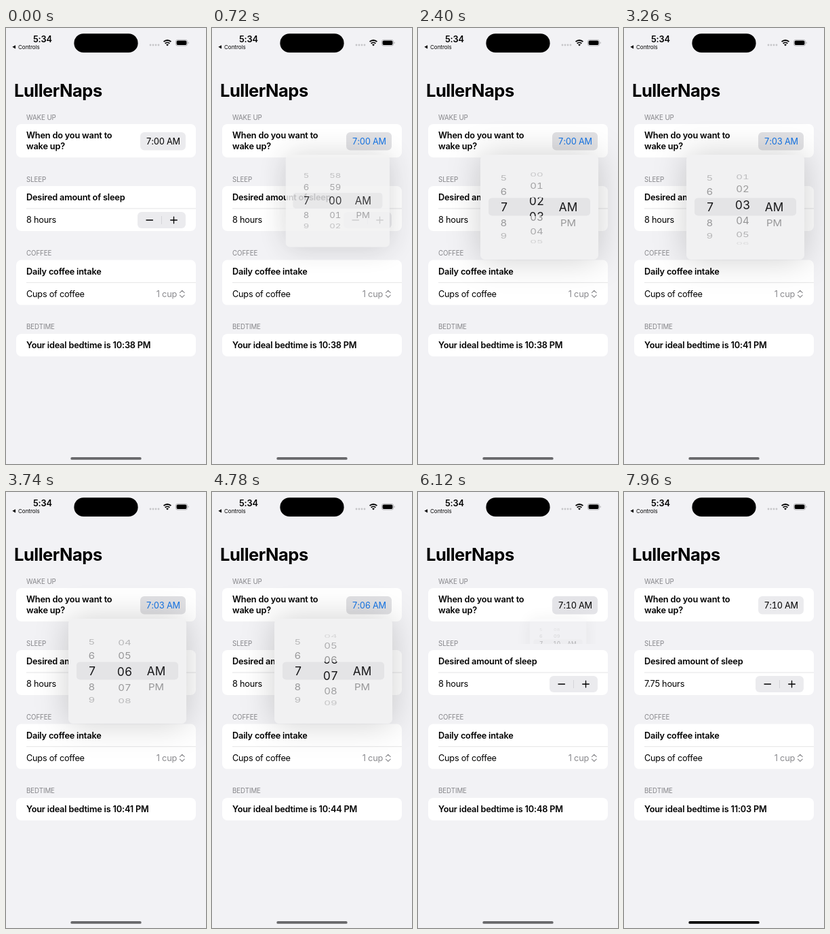
Recreate the animation shown at these times as an HTML page. Size 295 px wide and 640 px high, loop 8 s.

```html
<!DOCTYPE html>
<html lang="en">
<head>
<meta charset="utf-8">
<title>Bedtime planner</title>
<style>
html, body { margin: 0; height: 100%; overflow: hidden; background: #f2f2f5; }
svg { display: block; width: 295px; height: 640px; font: 12.75px Inter, "Liberation Sans", sans-serif; letter-spacing: -.25px; }
.bold { font-weight: 600; letter-spacing: -.19px; }
.head { font-size: 9.75px; fill: #858589; letter-spacing: -.1px; }
.card { fill: #fff; }
.line { stroke: #dcdcdf; stroke-width: .8; }
.icon { fill: none; stroke: #000; stroke-width: 1.3; stroke-linecap: round; stroke-linejoin: round; }
.panel { fill: #f1f1f2; filter: drop-shadow(0 0 24px rgba(0, 0, 0, .19)); }
#side, #mid { text-anchor: middle; letter-spacing: 0; }
#side { font-size: 15px; }
#mid { font-size: 17.3px; }
#side, #mid, #wake { font-variant-numeric: tabular-nums; }
</style>
</head>
<body>
<svg viewBox="0 0 295 640">
  <defs>
    <clipPath id="band"><rect x="104" y="249" width="150" height="27"/></clipPath>
    <clipPath id="rest"><path d="M92 186h174v63H92zM92 276h174v64H92z"/></clipPath>
    <clipPath id="fold"><rect id="foldBox" width="295" height="640"/></clipPath>
  </defs>

  <text class="bold" x="40" y="21">5:34</text>
  <path d="M14 25.2v5.2l-4.6-2.6z"/>
  <text x="18" y="31" font-size="8" letter-spacing="0">Controls</text>
  <rect x="100.4" y="8.3" width="94.2" height="27.8" rx="13.9"/>
  <g fill="#c6c6c9"><circle cx="213" cy="25" r="1.4"/><circle cx="217" cy="25" r="1.4"/><circle cx="221" cy="25" r="1.4"/><circle cx="225" cy="25" r="1.4"/></g>
  <g fill="none" stroke="#000" stroke-width="1.9">
    <path d="M232.6 20.2a7.6 7.6 0 0 1 10.8 0M234.7 22.7a4.7 4.7 0 0 1 6.6 0"/>
  </g>
  <path d="M236.2 24.4a2.6 2.6 0 0 1 3.6 0L238 26.4z"/>
  <rect x="250.4" y="17.4" width="17.2" height="8.7" rx="2.7" fill="none" stroke="#a4a4a7" stroke-width=".8"/>
  <rect x="251.6" y="18.6" width="14.8" height="6.3" rx="1.7"/>
  <path d="M268.6 20.3a1.6 1.6 0 0 1 0 3z" fill="#a4a4a7"/>

  <text x="12" y="100.5" font-size="25.5" font-weight="700" letter-spacing="-.5">LullerNaps</text>

  <text class="head" x="30" y="134.5">WAKE UP</text>
  <rect class="card" x="15" y="141" width="265" height="49" rx="7.5"/>
  <text class="bold" x="30" y="162">When do you want to</text>
  <text class="bold" x="30" y="178">wake up?</text>
  <rect id="button" x="198" y="153" width="67" height="26.5" rx="6"/>
  <text id="wake" x="231.7" y="171" text-anchor="middle"></text>

  <text class="head" x="30" y="225.5">SLEEP</text>
  <rect class="card" x="15" y="232" width="265" height="66" rx="7.5"/>
  <text class="bold" x="30" y="253.2">Desired amount of sleep</text>
  <path class="line" d="M30 265h250"/>
  <text id="hours" x="30" y="286.3"></text>
  <rect x="194" y="270" width="71" height="24" rx="6" fill="#ebebee"/>
  <path id="press" d="M200 270h29.5v24H200a6 6 0 0 1-6-6v-12a6 6 0 0 1 6-6z" fill="#dadade"/>
  <path d="M229.5 276v12" stroke="#cfcfd3" stroke-width=".8"/>
  <path class="icon" d="M207 282h9.5M242.7 282h9.6M247.5 277.2v9.6"/>

  <text class="head" x="30" y="333.5">COFFEE</text>
  <rect class="card" x="15" y="340.6" width="265" height="66" rx="7.5"/>
  <text class="bold" x="30" y="361.7">Daily coffee intake</text>
  <path class="line" d="M30 373.7h250"/>
  <text x="30" y="394.7">Cups of coffee</text>
  <text x="252" y="394.7" text-anchor="end" fill="#8a8a8e">1 cup</text>
  <path class="icon" style="stroke:#858589;stroke-width:1.1" d="M256.4 388.6l3.4-3.2 3.4 3.2M256.4 392.2l3.4 3.2 3.4-3.2"/>

  <text class="head" x="30" y="442">BEDTIME</text>
  <rect class="card" x="15" y="449" width="265" height="33" rx="7.5"/>
  <text id="bed" class="bold" x="30" y="470.2"></text>

  <g id="popover">
    <g id="foldable">
      <rect class="panel" x="92" y="186" width="174" height="154" rx="7"/>
      <rect x="104" y="249.5" width="150" height="26" rx="5" fill="#e4e4e6"/>
      <g clip-path="url(#rest)"><g id="side"></g></g>
      <g clip-path="url(#band)"><g id="mid"></g></g>
    </g>
  </g>
  <rect id="home" x="95.3" y="630" width="104.4" height="3.8" rx="1.9"/>
</svg>
<script>
const $ = id => document.getElementById(id);
const LOOP = 8000;

// Each track: [start ms, value...]; a value holds until the next start.
const POPOVER = [ // scale, opacity, visible share of height
  [0, 0, 0, 1], [500, .12, .1, 1], [610, .5, .45, 1], [720, .88, .85, 1], [830, 1.02, 1, 1], [940, 1, 1, 1],
  [6000, .86, .7, 1], [6120, .48, .3, .5], [6230, 0, 0, 1]];
const MINUTE = [
  [0, 0], [2060, .2], [2172, .9], [2284, 1.7], [2396, 2.4], [2500, 2.85], [2620, 3],
  [3260, 3.15], [3380, 4], [3500, 4.9], [3620, 5.65], [3740, 5.96], [4400, 6], [4630, 6.15],
  [4780, 6.7], [4897, 7.9], [5015, 9], [5130, 9.8], [5250, 10]];
const CHOSEN = [[0, 0], [3260, 3], [4400, 6], [5410, 10]];
const pad = n => String(n).padStart(2, '0');

function at(track, t) {
  return track.findLast(k => k[0] <= t).slice(1);
}

// Rows of a picker column wrapped around a cylinder.
function column(x, pos, label, strong) {
  let out = '';
  for (let i = Math.ceil(pos - 2.9); i <= pos + 2.9; i++) {
    const angle = (i - pos) * .43, text = label(i);
    if (!text) continue;
    const y = 263 + 56 * Math.sin(angle), c = Math.cos(angle);
    const alpha = strong ? 1 : Math.max(0, .56 * c - .1);
    out += `<text transform="translate(${x} ${y}) scale(1 ${c})" y="${strong ? 6.2 : 5.4}" fill="#161618" fill-opacity="${alpha}">${text}</text>`;
  }
  return out;
}

function wheels(minute, strong) {
  return column(strong ? 127 : 126.3, 7, i => i, strong)
    + column(175, minute, i => pad((i + 60) % 60), strong)
    + column(221.5, 0, i => ['AM', 'PM'][i], strong);
}

function draw(t) {
  const [scale, opacity, share] = at(POPOVER, t);
  const [minute] = at(MINUTE, t), [chosen] = at(CHOSEN, t);
  const active = t >= 500 && t < 6000, less = t >= 7740;

  $('popover').setAttribute('transform', `translate(232 186) scale(${scale}) translate(-232 -186)`);
  $('popover').setAttribute('opacity', opacity);
  $('foldBox').setAttribute('height', 186 + 154 * share);
  if (share < 1) $('foldable').setAttribute('clip-path', 'url(#fold)');
  else $('foldable').removeAttribute('clip-path');
  $('side').innerHTML = wheels(minute, false);
  $('mid').innerHTML = wheels(minute, true);

  $('button').setAttribute('fill', active ? '#e1e1e4' : t >= 6000 && t < 6230 ? '#e4e4e8' : '#ebebee');
  $('wake').setAttribute('fill', active ? '#1273e6' : '#000');
  $('wake').textContent = `7:${pad(chosen)} AM`;
  $('hours').textContent = less ? '7.75 hours' : '8 hours';
  $('bed').textContent = `Your ideal bedtime is ${less ? '11:03' : '10:' + (38 + chosen)} PM`;
  $('press').setAttribute('opacity', less && t < 7960 ? 1 : 0);
  $('home').setAttribute('fill', t < 6570 ? '#68686b' : '#000');
}

function tick() {
  draw(performance.now() % LOOP);
  requestAnimationFrame(tick);
}
tick();
</script>
</body>
</html>
```
